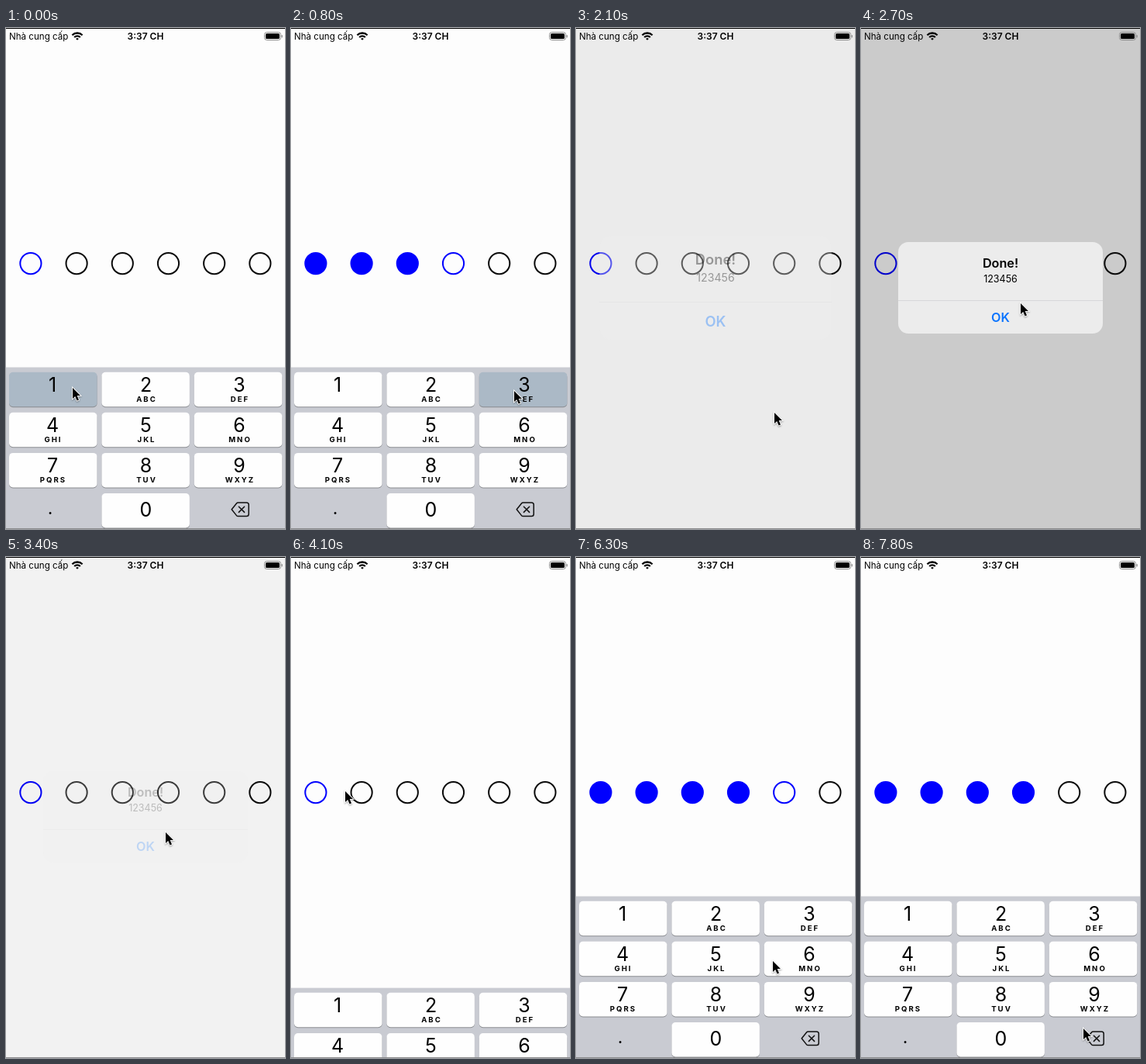
An HTML page with a canvas that plays this animation: 360 by 646 pixels, repeating every 8 s.

```html
<!DOCTYPE html>
<html lang="vi">
<head>
<meta charset="utf-8">
<style>
html, body { margin: 0; width: 100%; height: 100%; overflow: hidden; background: #fdfdfd; }
canvas { display: block; width: 360px; height: 646px; }
</style>
</head>
<body>
<canvas></canvas>
<script>
const canvas = document.querySelector('canvas');
const c = canvas.getContext('2d');
const dpr = window.devicePixelRatio || 1;
canvas.width = 360 * dpr;
canvas.height = 646 * dpr;

const LOOP = 8000, STEP = 100;
const FONT = 'Inter, Roboto, sans-serif';
const BLUE = '#0000fe', BLACK = '#0a0a0a';
const LETTERS = ' ABC DEF GHI JKL MNO PQRS TUV WXYZ'.split(' ');

const KEY_W = 113.5, KEY_H = 44.5, COL_W = 119.4, ROW_H = 52.1, LEFT = 4, TOP = 443.7;
const DELETE = 11, RESET = 2000;

// Time and place of each tap; the keys hit follow from the place.
const TAPS = [
  [0, 86, 464], [400, 184, 470], [700, 288, 468], [1100, 72, 517], [1500, 170, 496], [1800, 256, 496],
  [2700, 206, 355], [3900, 70, 302],
  [4800, 66, 523], [5300, 172, 570], [5700, 300, 588], [5900, 254, 521], [7500, 287, 608],
].map(([time, x, y]) => ({ time, x, y, key: keyAt(x, y) }));

function keyAt(x, y) {
  return y < TOP ? -1 : Math.floor((y - TOP) / ROW_H) * 3 + Math.floor((x - LEFT) / COL_W);
}

const clamp = x => Math.min(1, Math.max(0, x));
const span = (t, start, length) => clamp((t - start) / length);
const easeOut = x => 1 - (1 - x) ** 2;
const smooth = x => x * x * (3 - 2 * x);
const mix = (a, b, k) => a + (b - a) * k;

function text(str, x, y, size, weight = 400, color = '#000', align = 'center', spacing = 0) {
  c.font = `${weight} ${size}px ${FONT}`;
  c.textAlign = align;
  c.letterSpacing = spacing + 'px';
  c.fillStyle = color;
  c.fillText(str, x + spacing / 2, y);
  c.letterSpacing = '0px';
}

function box(x, y, w, h, r, color) {
  c.beginPath();
  c.roundRect(x, y, w, h, r);
  c.fillStyle = color;
  c.fill();
}

function statusBar() {
  text('Nhà cung cấp', 4, 15, 11.6, 400, '#000', 'left');
  text('3:37 CH', 180, 15, 12, 600);
  c.strokeStyle = '#000';
  c.lineWidth = 2.3;
  for (let r = 1.5; r < 10; r += 3.9) {
    c.beginPath();
    c.arc(92, 15.8, r, -Math.PI * 0.75, -Math.PI * 0.25);
    c.stroke();
  }
  c.strokeStyle = '#8a8a8a';
  c.lineWidth = 1;
  c.beginPath();
  c.roundRect(333.5, 5.5, 21, 10, 3);
  c.stroke();
  box(335, 7, 18, 7, 1.6, '#000');
  box(355.6, 9, 1.2, 3.4, 0.6, '#8a8a8a');
}

function dots(filled, focus) {
  c.lineWidth = 2;
  for (let i = 0; i < 6; i++) {
    c.beginPath();
    c.arc(31.9 + i * 59.2, 303.6, 13.6, 0, Math.PI * 2);
    c.strokeStyle = i < filled || i === focus ? BLUE : BLACK;
    c.stroke();
    c.fillStyle = BLUE;
    if (i < filled) c.fill();
  }
}

function deleteIcon(x, y, active) {
  c.save();
  c.translate(x, y);
  c.lineWidth = 1.5;
  c.lineJoin = c.lineCap = 'round';
  c.strokeStyle = c.fillStyle = '#111';
  c.beginPath();
  c.moveTo(-11, 0);
  c.arcTo(-4, -8.8, 11, -8.8, 2.5);
  c.arcTo(11, -8.8, 11, 8.8, 2.8);
  c.arcTo(11, 8.8, -4, 8.8, 2.8);
  c.arcTo(-4, 8.8, -11, 0, 2.5);
  c.closePath();
  c.stroke();
  if (active) {
    c.fill();
    c.strokeStyle = '#fff';
  }
  c.beginPath();
  for (const d of [-3.6, 3.6]) {
    c.moveTo(-1.8, -d);
    c.lineTo(5.4, d);
  }
  c.stroke();
  c.restore();
}

function keyboard(shift, pressed) {
  if (shift >= 1) return;
  c.save();
  c.translate(0, shift * 210);
  c.fillStyle = '#c9cbd2';
  c.fillRect(0, 437.5, 360, 210);
  for (let i = 0; i < 12; i++) {
    const x = LEFT + i % 3 * COL_W, y = TOP + Math.floor(i / 3) * ROW_H;
    const mid = 60 + i % 3 * 120.5;
    if (i === 9) text('.', 57, 626.5, 23);
    else if (i === DELETE) deleteIcon(302.2, 620.8, pressed === i);
    else {
      box(x, y + 1, KEY_W, KEY_H, 5, '#898b8f');
      box(x, y, KEY_W, KEY_H, 5, pressed === i ? '#abb9c6' : '#fefefe');
      text(i < 9 ? i + 1 : 0, mid, y + (i < 9 ? 24.8 : 30.3), 25);
      text(LETTERS[i] || '', mid, y + 37.9, 9.6, 700, '#000', 'center', 2);
    }
  }
  c.restore();
}

function alertBox(alpha, scale, pressed) {
  if (alpha <= 0) return;
  c.fillStyle = `rgba(0,0,0,${alpha * 0.2})`;
  c.fillRect(0, 0, 360, 646);
  c.save();
  c.globalAlpha = alpha;
  c.translate(180, 336);
  c.scale(scale, scale);
  box(-132, -60, 264, 118, 13, '#ececec');
  if (pressed) box(-132, 15, 264, 43, [0, 0, 13, 13], '#dadada');
  c.fillStyle = '#cfcfd2';
  c.fillRect(-132, 15, 264, 0.7);
  text('Done!', 0, -27.5, 16.2, 600);
  text('123456', 0, -8, 12.5);
  text('OK', 0, 43, 16.2, 600, '#0a74ff');
  c.restore();
}

// Rests at each tap, then glides to arrive just in time for the next.
function pointer(t) {
  const i = TAPS.findLastIndex(tap => tap.time <= t);
  const from = TAPS[i], to = TAPS[i + 1] || from;
  const travel = Math.min(500, (to.time - from.time) * 0.6) || 1;
  const k = smooth(span(t, to.time - travel, travel));
  c.save();
  c.translate(mix(from.x, to.x, k), mix(from.y, to.y, k));
  c.beginPath();
  [[0, 0], [0, 14], [3.2, 11], [5.6, 16.6], [8, 15.6], [5.7, 10.1], [10, 10]]
    .forEach(p => c.lineTo(...p));
  c.closePath();
  c.lineWidth = 1.8;
  c.strokeStyle = '#fff';
  c.shadowColor = 'rgba(0,0,0,.35)';
  c.shadowBlur = 2 * dpr;
  c.shadowOffsetY = dpr;
  c.stroke();
  c.shadowColor = 'transparent';
  c.fillStyle = '#000';
  c.fill();
  c.restore();
}

function draw(t) {
  c.setTransform(dpr, 0, 0, dpr, 0, 0);
  c.fillStyle = '#fdfdfd';
  c.fillRect(0, 0, 360, 646);

  const since = t < RESET ? 0 : RESET;
  const done = TAPS.filter(tap => tap.key >= 0 && tap.time >= since && tap.time + 100 <= t);
  const filled = done.filter(tap => tap.key !== DELETE).length;
  const focus = done.length > filled ? filled - 1 : filled;
  const press = TAPS.findLast(tap => tap.time <= t && t < tap.time + 200);

  const opening = easeOut(span(t, RESET, 500));
  const closing = (1 - span(t, 3200, 375)) ** 2;
  const shift = t < 3000 ? easeOut(span(t, 1900, 200)) : 1 - easeOut(span(t, 4000, 400));

  dots(filled, focus);
  keyboard(shift, press && press.key);
  alertBox(opening * closing, 1.21 - 0.21 * opening, t >= 3000 && t < 3200);
  statusBar();
  c.fillStyle = '#000';
  c.fillRect(0, 0, 360, 1);
  c.fillStyle = '#8c8c8e';
  c.fillRect(0, 645, 360, 1);
  pointer(t);
}

function loop() {
  draw(Math.floor(performance.now() % LOOP / STEP) * STEP);
  requestAnimationFrame(loop);
}
loop();
</script>
</body>
</html>
```
